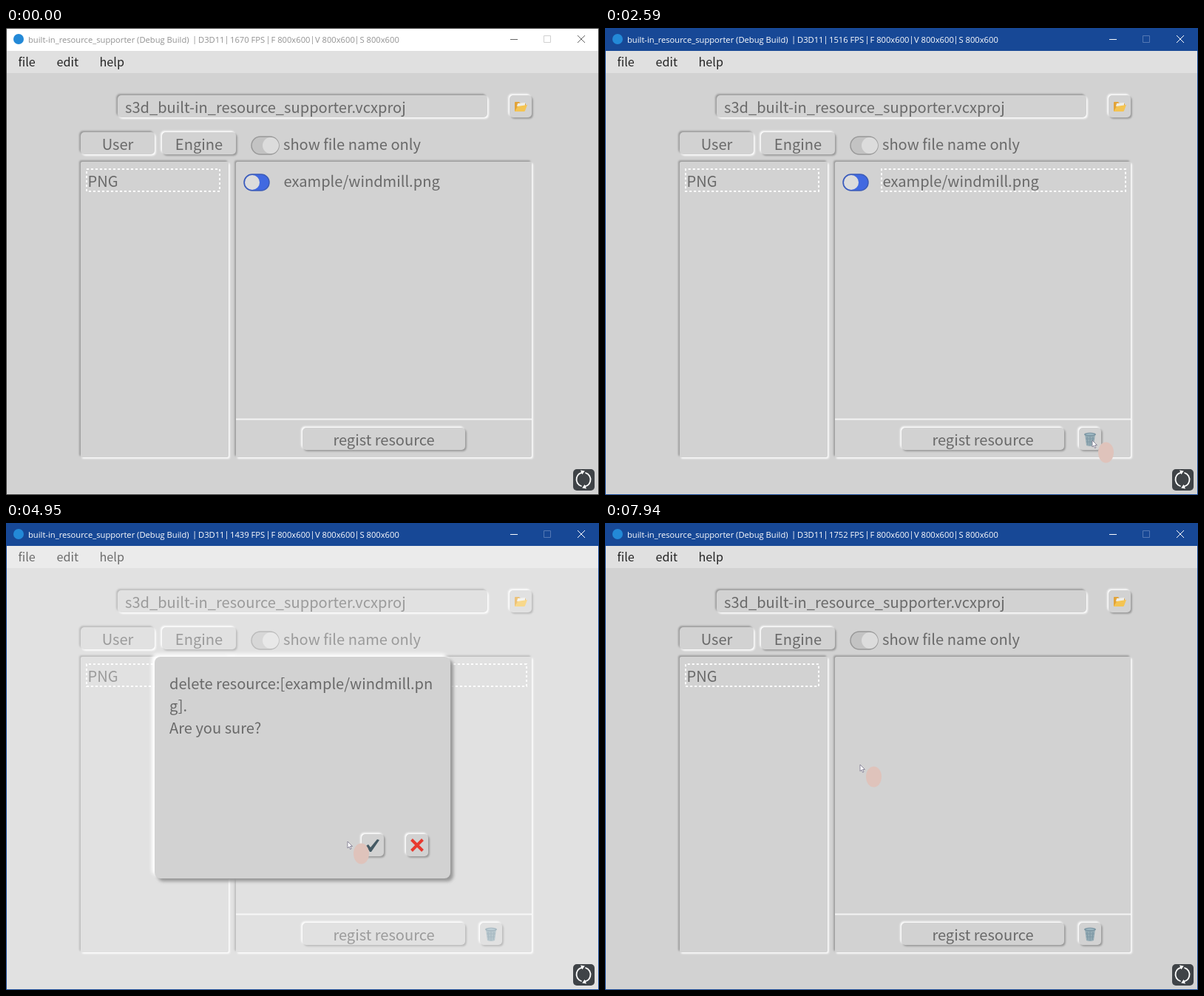
These frames come from a looping animation (802 by 632 pixels, 8 s). An HTML page:

```html
<!DOCTYPE html>
<html lang="en">
<head>
<meta charset="utf-8">
<title>Resource supporter</title>
<style>
  html, body { margin: 0; width: 100%; height: 100%; overflow: hidden; background: #d2d2d2; }
  svg { display: block; }
  text { font: 20.08px "Noto Sans CJK JP", "Noto Sans CJK", "Noto Sans", sans-serif; fill: #696969; white-space: pre; }
  .menu text { font-size: 16.2px; fill: #252525; }
  .title text { font: 11.2px "Open Sans", "Noto Sans", sans-serif; fill: var(--ink); }
  .title path { fill: none; stroke: var(--glyph); }
  .title .off { stroke: var(--off); }
  .ants { fill: none; stroke: #fff; stroke-width: 2; stroke-dasharray: 3 3; }
  #window { --bar: #fff; --ink: #929292; --glyph: #666; --off: #d0d0d0; --edge: #3c3c3c; }
  #window.active { --bar: #174896; --ink: #fff; --glyph: #fff; --off: #5478b4; --edge: #174896; }
</style>
</head>
<body>
<svg id="window" width="802" height="632" viewBox="0 0 802 632"></svg>
<script>
const LOOP = 8000;
const ENTER = 500, ACTIVATE = 1270, OPEN = 4050, CLOSE = 6200;
const RATES = [1670, 1423, 1516, 1537, 1560, 1439, 1470, 1618, 1752];
const RATE_PERIOD = 1020, RATE_OFFSET = 230;

// Each stroke carries the pointer from where it rested to a new place.
const ENTRY = { x: 729, y: 612 };
const STROKES = [
  { at: ENTER, lasts: 520, x: 421, y: 207 },
  { at: 1880, lasts: 500, x: 659, y: 558 },
  { at: 2650, lasts: 600, x: 664, y: 561 },
  { at: 4300, lasts: 500, x: 462, y: 431 },
  { at: 5030, lasts: 370, x: 495, y: 445 },
  { at: 7500, lasts: 420, x: 345, y: 327 }
];

const text = (x, y, s, extra = '') => `<text x="${x}" y="${y}" ${extra}>${s}</text>`;
const centered = (x, y, s) => text(x, y, s, 'text-anchor="middle"');
const rect = (x, y, w, h, r, extra) =>
  `<rect x="${x}" y="${y}" width="${w}" height="${h}" rx="${r}" ${extra}/>`;

// Soft embossed box: lit from the top left when raised, from the bottom right when sunken.
function box(x, y, w, h, r, isRaised, shift = 1.7, blur = 'soft') {
  const d = isRaised ? shift : -shift;
  return rect(x + d, y + d, w, h, r, `fill="#969696" filter="url(#${blur})"`) +
    rect(x - d, y - d, w, h, r, `fill="#fff" filter="url(#${blur})"`) +
    rect(x, y, w, h, r, 'fill="#d2d2d2"');
}
const raised = (x, y, w) => box(x, y, w, 30, 5, true);
const sunken = (x, y, w, h, r) => box(x, y, w, h, r, false);
const ants = (x, w) => rect(x, 191, w, 30, 0, 'class="ants"');

const toggle = (x, y, w, h, knobX, fill, edge) =>
  rect(x, y, w, h, h / 2, `fill="${fill}" stroke="${edge}" stroke-width="1.5"`) +
  `<circle cx="${knobX}" cy="${y + h / 2}" r="${h / 2 - 1}" fill="#dcdcdc"/>`;

const folder = `<g transform="translate(687 99)" opacity=".85">
  <path d="M1 14V2q0-1 1-1h5l2 2h6q1 0 1 1v4z" fill="#e59b1f"/>
  <path d="M5 3l10-1v5H4z" fill="#f4f4ee"/>
  <path d="M1 14L5 7l13-2-3 8q-.4 1-1.500 1z" fill="#fbc23c"/></g>`;

const trash = `<g transform="translate(648 547)" opacity=".8">
  <path d="M1 3h14l-2 15q-5 2-10 0z" fill="#87a3ae"/>
  <path d="M4 6l1 11M8 6v12M12 6l-1 11M2 9h12M3 13h10" stroke="#68899a" fill="none"/>
  <ellipse cx="8" cy="3" rx="8" ry="2.500" fill="#658596"/>
  <ellipse cx="8" cy="2.800" rx="6" ry="1.300" fill="#8fb0bd"/></g>`;

const bar = x => text(x, 19, '|', 'text-anchor="middle"');

const titleBar = `<g class="title">
  <rect x="1" y="1" width="800" height="30" fill="var(--bar)"/>
  <circle cx="17" cy="15" r="7" fill="#2389d7"/>
  ${text(30, 20, 'built-in_resource_supporter (Debug Build)')}${bar(255)}
  ${text(260, 20, 'D3D11')}${bar(298.5)}${text(303, 20, '', 'id="rate"')}${bar(354.5)}
  ${text(358.5, 20, 'F 800x600')}${bar(414.5)}${text(418, 20, 'V 800x600')}${bar(474.5)}
  ${text(478.5, 20, 'S 800x600')}
  <path d="M682 15.500h10M773 10l10 10m0-10l-10 10"/>
  <path class="off" d="M727.500 10.500h9v9h-9z"/></g>`;

const content = `
  <rect x="1" y="31" width="800" height="30" fill="#e0e0e0"/>
  <g class="menu">${text(16.5, 52, 'file')}${text(68.5, 52, 'edit')}${text(126.5, 52, 'help')}</g>
  ${sunken(151, 91, 500, 30, 5)}${text(161, 115, 's3d_built-in_resource_supporter.vcxproj')}
  ${raised(681, 91, 30)}${folder}
  ${sunken(101, 141, 100, 30, 5)}${centered(151, 165, 'User')}
  ${raised(211, 141, 100)}${centered(261, 165, 'Engine')}
  ${toggle(332, 147, 37, 24, 358, '#c3c3c3', '#999')}${text(375, 165, 'show file name only')}
  ${sunken(101, 181, 200, 400, 2)}${ants(109, 180)}${text(110.5, 215, 'PNG')}
  ${sunken(311, 181, 400, 400, 2)}
  <path d="M311 529.500h400" stroke="#f4f4f4" stroke-width="2"/>
  <g id="item">${toggle(322, 198, 34, 22, 333, '#4169e1', '#3c5cb8')}
    ${text(375.5, 215, 'example/windmill.png')}</g>
  <g id="selection">${ants(374, 330)}</g>
  ${raised(401, 541, 220)}${centered(511, 565, 'regist resource')}
  <g id="remove">${raised(641, 541, 30)}${trash}</g>`;

const dialog = `<g id="dialog">
  <rect x="1" y="31" width="800" height="600" fill="#fff" fill-opacity=".33"/>
  ${box(201, 181, 400, 300, 8, true, 4, 'wide')}
  ${text(221, 225, 'delete resource:[example/windmill.pn')}
  ${text(221, 255, 'g].')}${text(221, 285, 'Are you sure?')}
  ${raised(481, 421, 30)}${raised(541, 421, 30)}
  <path d="M487 437l3-2 3 4 9-11 3 1-11 16h-2z" fill="#455a64"/>
  <path d="M548.500 428.500l15 15m0-15l-15 15" stroke="#e8392f" stroke-width="4"/></g>`;

// Ring with two short gaps, an arrowhead at each.
const arrow = '<path d="M1-13l5 3-5 3z" fill="#fff"/>';
const refresh = `<g transform="translate(781 611)">
  <rect x="-14" y="-14" width="29" height="29" rx="5" fill="#3f4347"/>
  <circle r="9.500" fill="none" stroke="#fff" stroke-width="1.800" pathLength="100"
    stroke-dasharray="44 6" transform="rotate(-75)"/>
  <g transform="rotate(-22)">${arrow}<g transform="rotate(180)">${arrow}</g></g></g>`;

const pointer = `<g id="pointer">
  <ellipse cx="18.500" cy="16.500" rx="10.500" ry="14" fill="#dfc3bb"/>
  <path d="M0 0v9l2-2 1.500 3.500 1.500-.7L3.500 6.500h3z" fill="#fff" stroke="#77738a" stroke-width=".8"/></g>`;

const stage = document.getElementById('window');
stage.innerHTML = `<defs>
  <filter id="soft" x="-20%" y="-20%" width="140%" height="140%"><feGaussianBlur stdDeviation="1"/></filter>
  <filter id="wide" x="-10%" y="-10%" width="120%" height="120%"><feGaussianBlur stdDeviation="2"/></filter>
  </defs><rect width="802" height="632" fill="#d2d2d2"/>
  ${titleBar}${content}${dialog}${refresh}
  <rect x=".5" y=".5" width="801" height="631" fill="none" stroke="var(--edge)"/>${pointer}`;

const [rate, item, selection, removeButton, dialogBox, cursor] =
  ['rate', 'item', 'selection', 'remove', 'dialog', 'pointer'].map(id => document.getElementById(id));
const antRects = document.querySelectorAll('.ants');
const show = (el, on) => { el.style.display = on ? '' : 'none'; };
const ease = k => Math.sin(k * Math.PI / 2);

function pointerAt(t) {
  let { x, y } = ENTRY;
  for (const stroke of STROKES) {
    const k = ease(Math.min(1, Math.max(0, (t - stroke.at) / stroke.lasts)));
    x += (stroke.x - x) * k;
    y += (stroke.y - y) * k;
  }
  return [Math.round(x), Math.round(y)];
}

function draw(t) {
  stage.classList.toggle('active', t >= ACTIVATE);
  rate.textContent = RATES[Math.floor((t + RATE_OFFSET) / RATE_PERIOD)] + ' FPS';
  show(item, t < CLOSE);
  show(selection, t >= ACTIVATE && t < CLOSE);
  show(removeButton, t >= ACTIVATE);
  show(dialogBox, t >= OPEN && t < CLOSE);
  show(cursor, t >= ENTER);
  cursor.setAttribute('transform', `translate(${pointerAt(t)})`);
  antRects.forEach(r => { r.style.strokeDashoffset = -t * 0.02; });
}

const start = performance.now();
function tick() {
  draw((performance.now() - start) % LOOP);
  requestAnimationFrame(tick);
}
tick();
</script>
</body>
</html>
```
